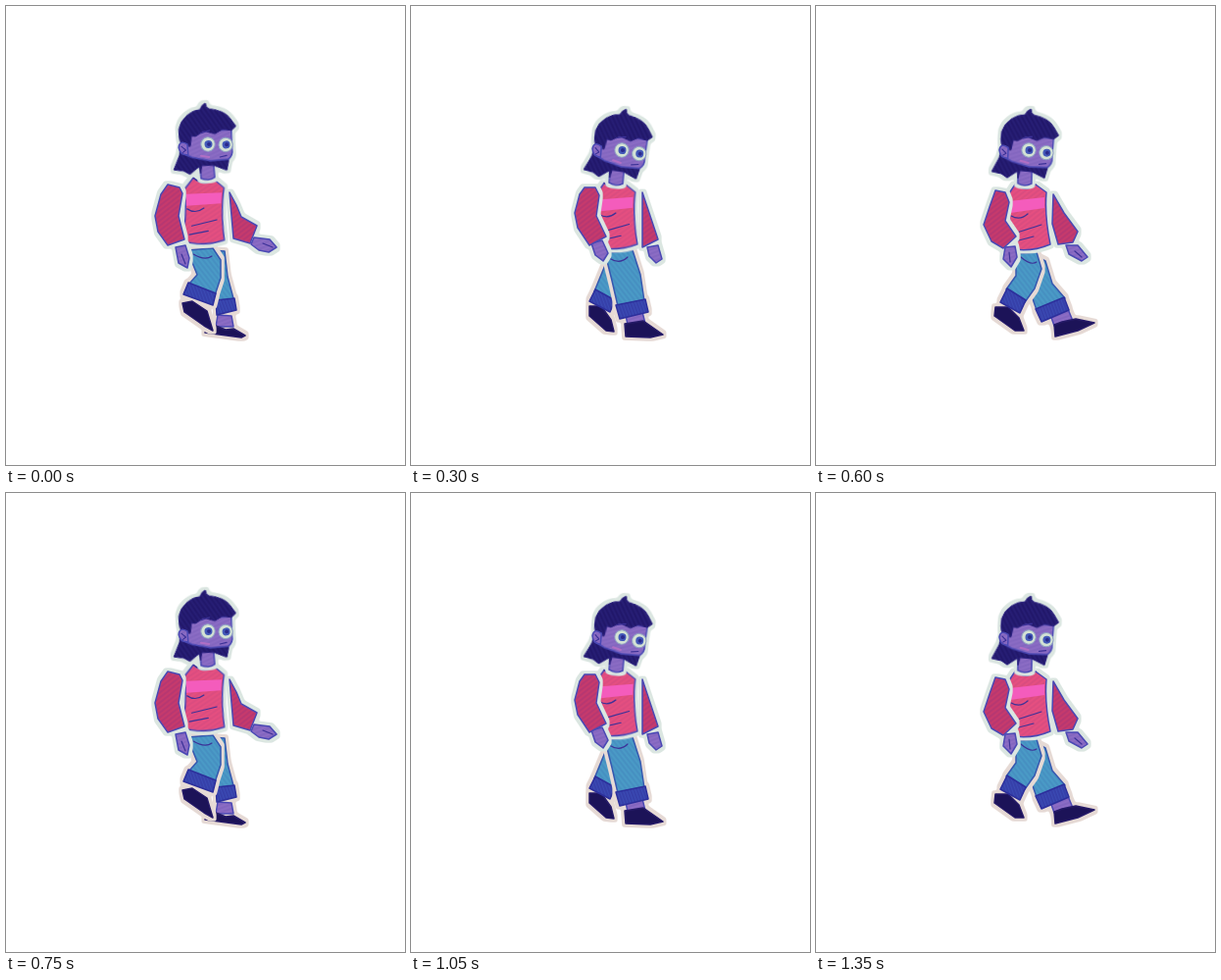
These frames come from a looping animation (407x468 px, 1.5 s). An HTML page without scripts:

```html
<!DOCTYPE html>
<html lang="en">
<head>
<meta charset="utf-8">
<title>Paper cut-out walk</title>
<style>
html,body{margin:0;width:100%;height:100%;overflow:hidden;background:#fff}
svg{display:block;width:100vw;height:100vh}
path,circle,ellipse{stroke-linejoin:round;stroke-linecap:round}
.cut{filter:url(#paper)}
.leg{filter:url(#card)}
.sleeve,.jeans,.cuff,.shoe,.skin,.shirt{stroke:#4a48b4;stroke-width:1.5}
.sleeve{fill:url(#red)}
.shirt{fill:url(#rose)}
.jeans{fill:url(#denim);stroke:#3558b0}
.cuff{fill:url(#blue);stroke:#2c2f9c}
.shoe{fill:#1c1358;stroke:#251a68}
.skin{fill:url(#lilac)}
.hair{fill:url(#ink);stroke:#2a2080;stroke-width:1}
.line{fill:none;stroke:#3c3298;stroke-width:1.2}
.pose{opacity:0;animation:show 750ms step-end infinite}
.p2{animation-delay:-600ms}
.p3{animation-delay:-450ms}
.p4{animation-delay:-300ms}
.p5{animation-delay:-150ms}
.lids{animation:blink 1500ms step-end infinite}
@keyframes show{0%{opacity:1}20%,100%{opacity:0}}
@keyframes blink{0%{opacity:1}50%,100%{opacity:0}}
</style>
</head>
<body>
<svg viewBox="0 0 407 468">
<defs>
  <!-- die-cut paper margin around a part -->
  <filter id="paper" x="-30%" y="-30%" width="160%" height="160%" color-interpolation-filters="sRGB">
    <feMorphology in="SourceAlpha" operator="dilate" radius="3"/>
    <feGaussianBlur stdDeviation="1"/>
    <feComponentTransfer result="edge"><feFuncA type="linear" slope="3" intercept="-1"/></feComponentTransfer>
    <feFlood flood-color="#dbe6e1"/>
    <feComposite in2="edge" operator="in" result="rim"/>
    <feMerge><feMergeNode in="rim"/><feMergeNode in="SourceGraphic"/></feMerge>
  </filter>
  <filter id="card" x="-30%" y="-30%" width="160%" height="160%" color-interpolation-filters="sRGB">
    <feMorphology in="SourceAlpha" operator="dilate" radius="2.5"/>
    <feGaussianBlur stdDeviation="1"/>
    <feComponentTransfer result="edge"><feFuncA type="linear" slope="3" intercept="-1"/></feComponentTransfer>
    <feFlood flood-color="#e6dad5"/>
    <feComposite in2="edge" operator="in" result="rim"/>
    <feMerge><feMergeNode in="rim"/><feMergeNode in="SourceGraphic"/></feMerge>
  </filter>

  <!-- crayon fills -->
  <pattern id="red" width="9" height="4" patternUnits="userSpaceOnUse" patternTransform="rotate(-38)">
    <path fill="#c63a6c" d="M0 0h9v4H0z"/><path stroke="#a93476" d="M0 1h9"/>
  </pattern>
  <pattern id="rose" width="9" height="4" patternUnits="userSpaceOnUse" patternTransform="rotate(-38)">
    <path fill="#e54f80" d="M0 0h9v4H0z"/><path stroke="#d0487f" d="M0 1h9"/>
  </pattern>
  <pattern id="denim" width="9" height="4" patternUnits="userSpaceOnUse" patternTransform="rotate(52)">
    <path fill="#4a9ac6" d="M0 0h9v4H0z"/><path stroke="#4286bd" d="M0 1h9"/>
  </pattern>
  <pattern id="blue" width="9" height="3" patternUnits="userSpaceOnUse" patternTransform="rotate(70)">
    <path fill="#3b4bb4" d="M0 0h9v3H0z"/><path stroke="#31359f" d="M0 1h9"/>
  </pattern>
  <pattern id="lilac" width="9" height="4" patternUnits="userSpaceOnUse" patternTransform="rotate(-20)">
    <path fill="#8b6cc4" d="M0 0h9v4H0z"/><path stroke="#7b60bb" d="M0 1h9"/>
  </pattern>
  <pattern id="ink" width="9" height="4" patternUnits="userSpaceOnUse" patternTransform="rotate(60)">
    <path fill="#21176a" d="M0 0h9v4H0z"/><path stroke="#2d247f" d="M0 1h9"/>
  </pattern>

  <g id="eye">
    <circle r="7.2" fill="#d3e2d4" stroke="#8f9fc4"/>
    <circle cx=".5" r="4" fill="#4358b8"/>
    <circle cx="1" r="2" fill="#2b2a8c"/>
  </g>
  <g id="lid">
    <circle r="7.4" fill="#957dc8" stroke="#a9a0d2"/>
    <path class="line" d="M-5 2Q0 5 6 1" stroke="#6250b0"/>
  </g>

  <g id="head">
    <g class="cut">
      <path class="skin" d="M201 158L201 177Q208 181 215 177L215 160Z"/>
      <path class="hair" d="M184 140L181 152L174 166L184 168L190 172L200 165L201 172L203 164L215 165L228 171L232 156Z"/>
      <path class="skin" d="M184 128L236 130L235 149Q236 157 230 160L212 160L194 155L184 150Z"/>
      <path class="hair" d="M184 142Q178 122 192 112Q199 107 206 107Q208 102 212 101Q212 105 215 107Q231 110 236 119L241 127L236 131L227 129L219 133L208 129L199 134L195 133L193 143Z"/>
    </g>
    <path class="skin" d="M190 141Q182 136 181 144Q182 152 190 152Z"/>
    <path class="line" d="M184 143L188 147L185 149M205 131L214 129M222 157L229 156"/>
    <path fill="none" stroke="#b06fc4" stroke-width="2" d="M203 154L211 156"/>
    <use href="#eye" x="211" y="143"/>
    <use href="#eye" x="229" y="145"/>
  </g>

  <g id="torso">
    <g class="cut">
      <path class="shirt" d="M197 178Q208 186 218 178L229 186Q227 210 233 239Q212 248 190 243Q194 216 189 190Z"/>
    </g>
    <path fill="#f45cbc" d="M191 195L227 191L227 202L192 207Z"/>
    <path class="line" d="M197 178Q208 186 218 178" stroke-width="2"/>
    <path class="line" d="M193 210Q202 215 210 208" stroke="#a82f70"/>
    <path class="line" d="M199 227L224 219M197 236L216 231" stroke="#f07a9c"/>
  </g>
</defs>

<g class="pose p1">
  <g class="cut">
    <path class="skin" d="M253 236L269 238L276 246L268 251L258 249L250 243Z"/>
    <path class="sleeve" d="M228 190L235 203L240 215L256 224L249 242L232 237Z"/>
    <path class="line" d="M262 242L272 246"/>
  </g>
  <g class="leg">
    <path class="skin" d="M216 315L230 316L232 327L214 327Z"/>
    <path class="jeans" d="M208 249L223 250L226 276L233 302L213 303Z"/>
    <path class="cuff" d="M214 300L233 298L235 310L215 315Z"/>
    <path class="shoe" d="M203 333L209 324L224 330L232 329L244 336L240 338Z"/>
  </g>
  <g class="leg">
    <path class="shoe" d="M180 303L190 301L205 311L211 331L202 326L182 312Z"/>
    <path class="jeans" d="M185 249L211 247L219 259L219 277L213 295L187 283L195 274Z"/>
    <path class="cuff" d="M186 282L214 293L211 305L181 294Z"/>
    <path class="line" d="M191 253Q203 260 210 255"/>
  </g>
  <use href="#torso" transform="translate(-6 -2) rotate(4 208 178)"/>
  <use href="#head" transform="translate(-5 -2) rotate(-5 211 143)"/>
  <g class="cut">
    <path class="skin" d="M173 246L183 244L187 257L185 267L176 262Z"/>
    <path class="sleeve" d="M165 182L177 185L180 191L176 214L182 238L165 244L155 230L152 214L158 192Z"/>
    <path class="line" d="M179 253L183 263"/>
  </g>
</g>

<g class="pose p2">
  <g class="cut">
    <path class="skin" d="M240 244L250 243L258 255L250 258L242 254Z"/>
    <path class="sleeve" d="M233 190L236 214L250 237L246 242L232 245Z"/>
  </g>
  <g class="leg">
    <path class="skin" d="M199 312L217 314L220 323L198 323Z"/>
    <path class="jeans" d="M200 266L223 270L222 304L191 301Z"/>
    <path class="cuff" d="M190 299L222 303L221 314L188 310Z"/>
    <path class="shoe" d="M192 321L202 323L216 321L223 328L234 337L214 335L195 331Z"/>
  </g>
  <g class="leg">
    <path class="skin" d="M226 291L240 288L242 296L228 298Z"/>
    <path class="jeans" d="M188 253L208 246L232 247L240 258L240 277L220 282L216 271L198 270L188 262Z"/>
    <path class="cuff" d="M219 281L241 276L243 288L223 293Z"/>
    <path class="shoe" d="M225 296L243 291L250 293L266 296L246 301L227 306Z"/>
    <path class="line" d="M190 262Q209 268 218 259"/>
  </g>
  <use href="#torso"/>
  <use href="#head"/>
  <g class="cut">
    <path class="skin" d="M170 245L179 245L179 259L174 265L166 259L165 252Z"/>
    <path class="sleeve" d="M174 181L185 180L190 186L188 213L190 240L167 237L170 210L170 188Z"/>
    <path class="line" d="M172 251L171 260"/>
  </g>
</g>

<g class="pose p3">
  <g class="cut">
    <path class="skin" d="M241 246L252 244L256 258L250 262L243 255Z"/>
    <path class="sleeve" d="M236 190L244 214L252 238L236 246Z"/>
  </g>
  <g class="leg">
    <path class="shoe" d="M182 306L194 306L204 320L207 332L199 331L182 316Z"/>
    <path class="jeans" d="M203 252L222 262L214 285L206 302L187 291Z"/>
    <path class="cuff" d="M188 289L208 300L203 312L182 301Z"/>
  </g>
  <g class="leg">
    <path class="skin" d="M219 315L236 312L239 324L221 325Z"/>
    <path class="jeans" d="M198 252L226 249L234 274L238 301L211 306L205 280Z"/>
    <path class="cuff" d="M209 305L239 299L242 312L213 319Z"/>
    <path class="shoe" d="M218 324L237 321L257 335L244 338L219 337Z"/>
    <path class="line" d="M202 257Q213 264 221 256"/>
  </g>
  <use href="#torso" transform="translate(0 3) rotate(2 208 178)"/>
  <use href="#head" transform="translate(4 4) rotate(5 211 143)"/>
  <g class="cut">
    <path class="skin" d="M184 242L195 239L201 252L196 260L188 254Z"/>
    <path class="sleeve" d="M177 185L188 185L192 193L189 214L199 235L182 244L170 226L167 211L172 192Z"/>
  </g>
</g>

<g class="pose p4">
  <g class="cut">
    <path class="skin" d="M241 248L249 248L256 264L252 269L244 260Z"/>
    <path class="sleeve" d="M236 191L243 208L251 220L253 238L246 248L235 243Z"/>
  </g>
  <g class="leg">
    <path class="shoe" d="M187 275L195 275L195 304L186 302Z"/>
    <path class="jeans" d="M224 250L238 253L250 272L248 283L220 294Z"/>
  </g>
  <g class="leg">
    <path class="skin" d="M199 317L217 319L220 328L199 328Z"/>
    <path class="jeans" d="M200 252L226 251L225 276L221 307L191 304L197 280Z"/>
    <path class="cuff" d="M190 304L222 307L220 319L188 316Z"/>
    <path class="shoe" d="M195 327L203 326L217 328L225 332L236 338L214 339L194 335Z"/>
    <path class="line" d="M203 260Q213 264 221 258"/>
  </g>
  <use href="#torso" transform="translate(-1 3) rotate(4 208 178)"/>
  <g transform="translate(8 6) rotate(10 211 143)">
    <use href="#head"/>
    <g class="lids">
      <use href="#lid" x="211" y="143"/>
      <use href="#lid" x="229" y="145"/>
    </g>
  </g>
  <g class="cut">
    <path class="skin" d="M207 233L217 229L229 237L231 245L222 246L211 240Z"/>
    <path class="sleeve" d="M181 185L192 186L197 193L196 207L216 225L206 238L187 229L179 215L177 196Z"/>
    <path class="line" d="M218 236L226 243"/>
  </g>
</g>

<g class="pose p5">
  <g class="cut">
    <path class="skin" d="M255 244L267 244L277 256L271 260L258 253Z"/>
    <path class="sleeve" d="M242 192L253 211L267 230L262 241L247 243L241 222Z"/>
    <path class="line" d="M264 250L271 256"/>
  </g>
  <g class="leg">
    <path class="skin" d="M239 315L257 309L262 321L243 326Z"/>
    <path class="jeans" d="M222 254L234 260L241 283L254 298L225 310L218 290Z"/>
    <path class="cuff" d="M224 309L253 297L258 310L230 322Z"/>
    <path class="shoe" d="M243 325L251 322L265 319L284 323L267 331L244 337Z"/>
  </g>
  <g class="leg">
    <path class="shoe" d="M183 307L196 307L207 318L212 331L203 331L182 316Z"/>
    <path class="jeans" d="M204 253L225 251L230 268L223 288L213 302L194 289L204 275Z"/>
    <path class="cuff" d="M195 288L214 300L208 313L188 302Z"/>
    <path class="line" d="M209 256Q219 265 225 261" stroke-width="2"/>
  </g>
  <use href="#torso" transform="translate(6 4)"/>
  <use href="#head" transform="translate(6 4) rotate(2 211 143)"/>
  <g class="cut">
    <path class="skin" d="M193 246L203 245L205 256L199 266L191 258Z"/>
    <path class="sleeve" d="M183 188L193 190L197 200L193 219L204 235L191 247L179 240L171 223L177 205Z"/>
    <path class="line" d="M197 251L198 261"/>
  </g>
</g>
</svg>
</body>
</html>
```
